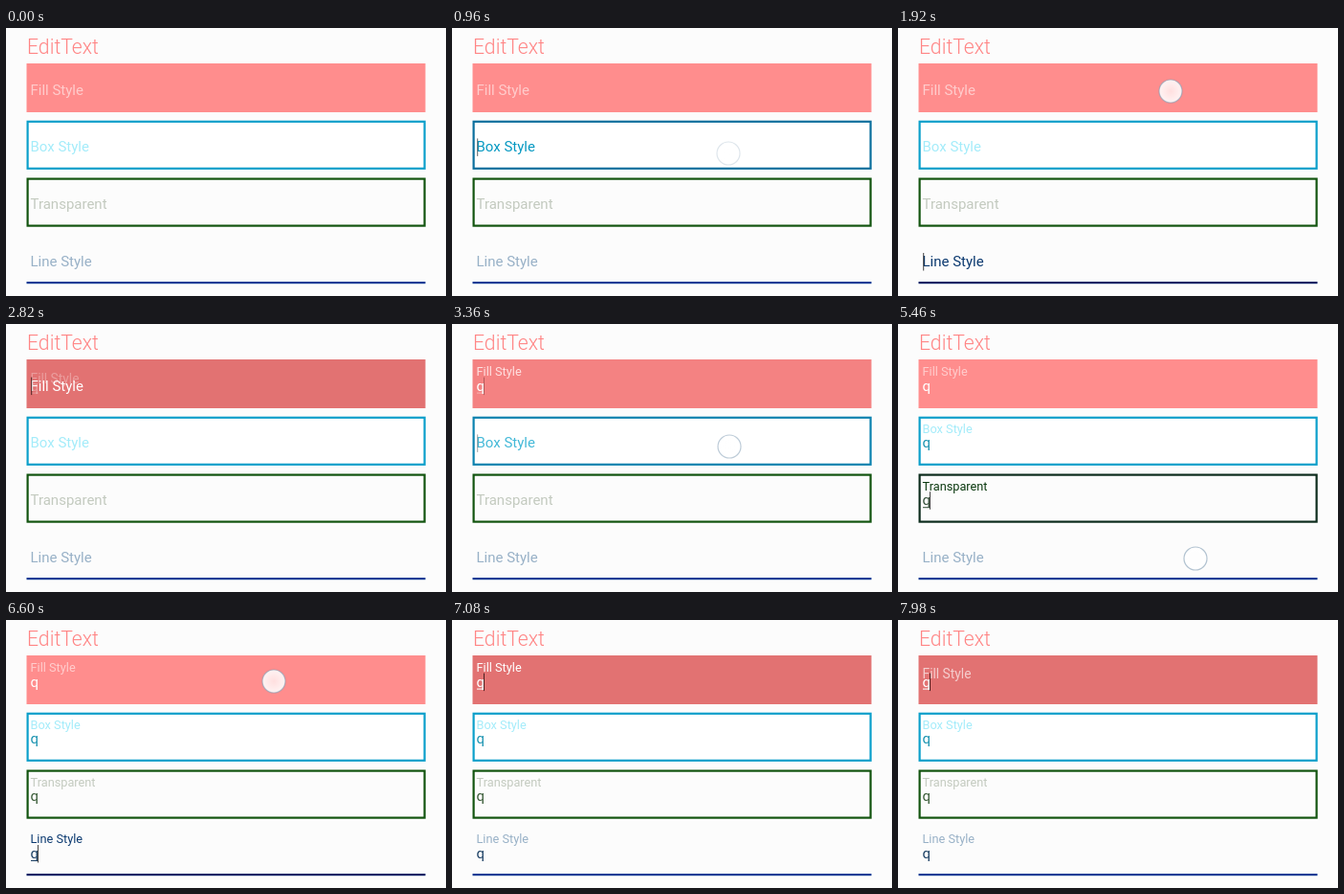
These frames come from a looping animation (460x280 px, 8000 ms). An HTML page:

```html
<!DOCTYPE html>
<html lang="en">
<head>
<meta charset="utf-8">
<title>EditText styles</title>
<style>
  html, body { margin: 0; width: 100%; height: 100%; overflow: hidden; background: #fcfcfc; }
  svg { display: block; width: 460px; height: 280px; font-family: Roboto, sans-serif; }
</style>
</head>
<body>
<svg id="stage" viewBox="0 0 460 280">
  <defs>
    <radialGradient id="glow">
      <stop offset="0" stop-color="#fff" stop-opacity=".72"/>
      <stop offset="1" stop-color="#fff" stop-opacity=".9"/>
    </radialGradient>
  </defs>
  <rect width="460" height="280" fill="#fcfcfc"/>
  <text x="22" y="26.5" font-size="21.2" font-weight="300" fill="#ff8585">EditText</text>
</svg>
<script>
const LOOP = 8000;
const stage = document.getElementById('stage');

// Colour pairs are [idle, focused]; edits are the times at which "q" appears or vanishes.
const fields = [
  { name: 'Fill Style', kind: 'fill', paint: ['#ff8d8d', '#e27272'], hint: ['#ffcccc', '#ffffff'],
    value: ['#ffffff', '#ffffff'], caret: '#4a2020', edits: [2820, 7200, 7920] },
  { name: 'Box Style', kind: 'box', back: '#ffffff', paint: ['#0a9fca', '#0b6f9d'], hint: ['#a4ecfa', '#0799c2'],
    value: ['#1a93b0', '#2a9cc2'], caret: '#5c6468', edits: [3840] },
  { name: 'Transparent', kind: 'box', back: 'none', paint: ['#12540f', '#0c2c1c'], hint: ['#c3cabf', '#0c3a10'],
    value: ['#3a5c38', '#35503a'], caret: '#444444', edits: [4980] },
  { name: 'Line Style', kind: 'line', paint: ['#123d96', '#051d64'], hint: ['#98b1c7', '#0c3a70'],
    value: ['#1c4064', '#1c4064'], caret: '#444444', edits: [6000] }
];

// Taps: start time, field index, position.
const taps = [
  [240, 0, 284, 66], [720, 1, 289, 131], [1110, 2, 292, 188], [1560, 3, 300, 243], [1920, 0, 285, 66],
  [3180, 1, 290, 128], [4380, 2, 300, 187], [5460, 3, 311, 245], [6480, 0, 280, 64]
];
const caretOff = [[2340, 2580], [4320, 4500], [5470, 5580], [6480, 6600], [7740, 7920]];

function add(tag, attrs) {
  const el = document.createElementNS('http://www.w3.org/2000/svg', tag);
  set(el, attrs);
  return stage.appendChild(el);
}
function set(el, attrs) {
  for (const key in attrs) el.setAttribute(key, attrs[key]);
}
const clamp = v => Math.min(1, Math.max(0, v));
const easeOut = v => 1 - (1 - clamp(v)) ** 2;
const lerp = (a, b, k) => a + (b - a) * k;
const rgb = hex => [1, 3, 5].map(i => parseInt(hex.slice(i, i + 2), 16));
function mix([a, b], k) {
  const to = rgb(b);
  return `rgb(${rgb(a).map((v, i) => Math.round(lerp(v, to[i], k)))})`;
}

fields.forEach((f, i) => {
  f.y = 37 + i * 59.8;
  f.base = f.y + 32.6;
  if (f.kind === 'fill') f.frame = add('rect', { x: 21.5, y: 37, width: 417, height: 51 });
  if (f.kind === 'box') f.frame = add('rect', { x: 22.6, y: f.y + 1, width: 415, height: 49, fill: f.back, 'stroke-width': 2.2 });
  if (f.kind === 'line') f.frame = add('rect', { x: 21.5, y: 265, width: 417, height: 2.2 });
  f.ghost = add('text', { x: 25.5, y: f.base - 8, 'font-size': 13.8, opacity: 0 });
  f.label = add('text', { x: 25.5 });
  f.ghost.textContent = f.label.textContent = f.name;
  f.text = add('text', { x: 25.4, y: f.base, 'font-size': 15 });
  f.text.textContent = 'q';
  f.under = add('rect', { x: 26, y: f.base + 2, width: 7.6, height: 1 });
  f.bar = add('rect', { y: f.base - 14, width: 1, height: 18.5, fill: f.caret });
});
const dot = add('circle', { r: 12, fill: 'url(#glow)', stroke: '#7f9bb2', 'stroke-opacity': .6, 'stroke-width': 1.2 });

function focusOf(index, t) {
  let focus = 0;
  for (const [start, target] of taps) {
    const k = clamp((t - start - 120) / 100);
    focus = lerp(focus, target === index ? 1 : 0, k);
  }
  return focus;
}

function drawField(f, i, t) {
  const focus = focusOf(i, t);
  const done = f.edits.filter(e => e <= t);
  const filled = done.length % 2 === 1;
  const age = done.length ? t - done[done.length - 1] : Infinity;
  const fresh = age < 60;
  const moved = fresh ? 0 : easeOut((age + 20) / 260);
  const up = filled ? moved : 1 - moved;
  const lift = done.length ? up : 0;
  const hint = mix(f.hint, focus);
  const value = mix(f.value, focus);
  const shown = filled ? (fresh ? .3 : 1) : (fresh ? .7 : 0);

  set(f.frame, { [f.kind === 'box' ? 'stroke' : 'fill']: mix(f.paint, focus) });
  set(f.label, {
    y: lerp(f.base, f.base - 15.7, lift),
    'font-size': lerp(15, 12.75, lift),
    fill: hint,
    opacity: 1 - .35 * Math.sin(Math.PI * lift)
  });
  set(f.ghost, { fill: hint, opacity: fresh ? .3 : 0 });
  set(f.text, { fill: value, opacity: shown });
  set(f.under, { fill: value, opacity: shown * focus });

  const hidden = caretOff.some(([a, b]) => t >= a && t < b);
  set(f.bar, { x: filled !== fresh ? 33 : 26.2, opacity: hidden ? 0 : focus });
}

function draw(t) {
  fields.forEach((f, i) => drawField(f, i, t));
  const tap = taps.find(([start]) => t >= start && t < start + 300);
  if (!tap) return set(dot, { opacity: 0 });
  const [start, , cx, cy] = tap;
  set(dot, { cx, cy, opacity: 1 - clamp((t - start - 160) / 140) });
}

const begin = performance.now();
function tick() {
  draw((performance.now() - begin) % LOOP);
  requestAnimationFrame(tick);
}
tick();
</script>
</body>
</html>
```
